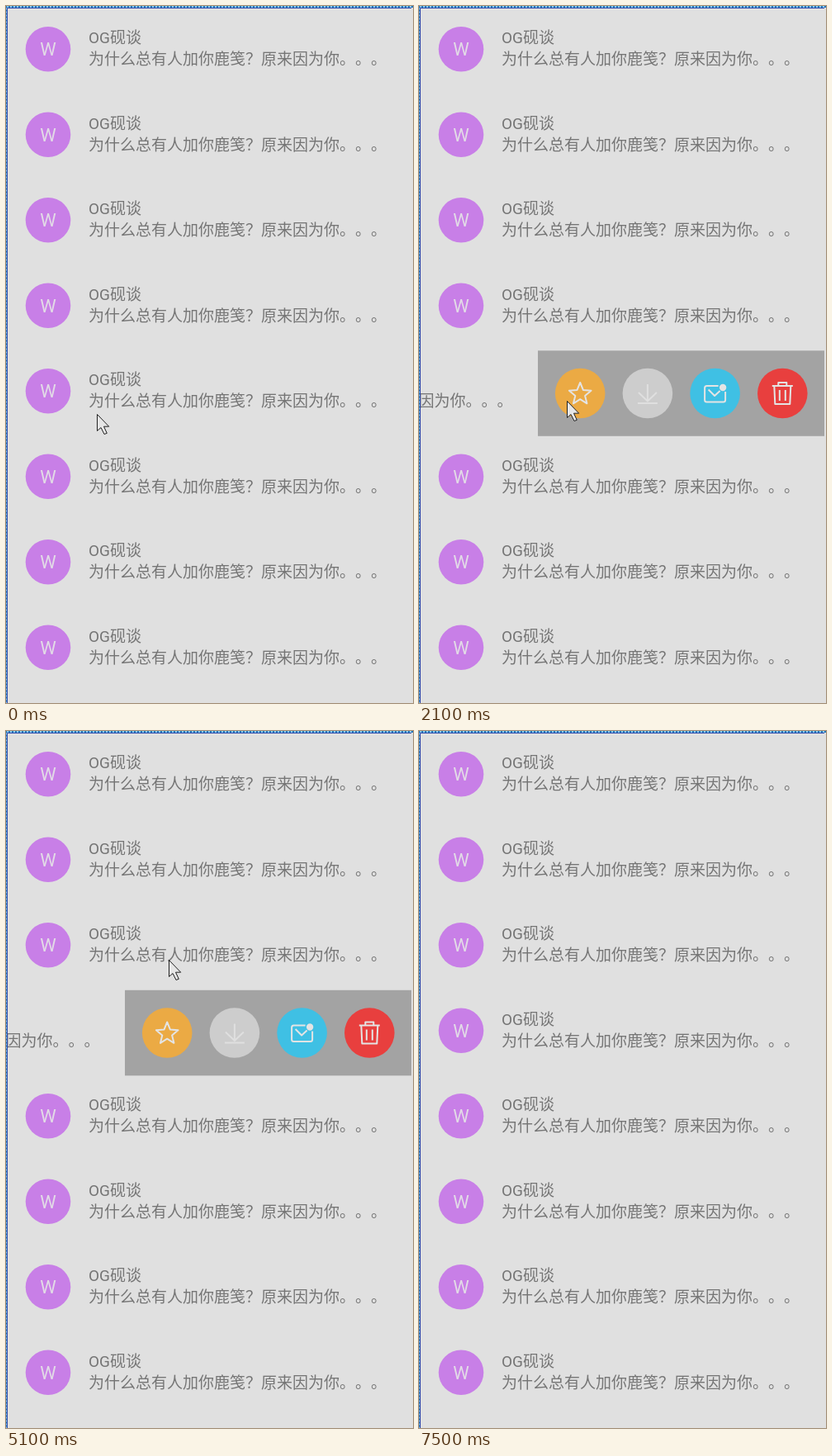
These frames come from a looping animation (493x844 px, 8 s). An HTML page:

```html
<!DOCTYPE html>
<html lang="zh-CN">
<head>
<meta charset="utf-8">
<title>滑动列表</title>
<style>
html, body { margin: 0; width: 100%; height: 100%; overflow: hidden; background: #e0e0e0; }
svg { display: block; }
text { font: 19px Roboto, "Noto Sans CJK SC", sans-serif; fill: #757575; text-spacing-trim: space-all; }
.letter { font-size: 22px; fill: #e2dbe6; text-anchor: middle; }
.icon { fill: none; stroke: #e4e4e4; stroke-width: 2; stroke-linejoin: round; }
</style>
</head>
<body>
<svg width="493" height="844" viewBox="0 0 493 844">
  <defs>
    <clipPath id="view"><rect y="3" width="491" height="841"/></clipPath>
    <g id="item">
      <circle cx="51" cy="49" r="27.3" fill="#c87fe7"/>
      <text class="letter" x="51" y="57">W</text>
      <text x="100" y="42">OG砚谈</text>
      <text x="100" y="68">为什么总有人加你鹿笺&#xFF1F;原来因为你。。。</text>
    </g>
    <path id="star"/>
    <path id="download" stroke-opacity=".8" d="M0-11V9M-11-1L0 9.5L11-1M-12 12H12"/>
    <g id="mail">
      <path d="M4-9H-10Q-12.5-9-12.5-6.5V8Q-12.5 10.5-10 10.5H10Q12.5 10.5 12.5 8V-2M-8-4.5L-.5 3L6-3"/>
      <circle cx="9.5" cy="-7" r="3.2" fill="#e4e4e4"/>
    </g>
    <path id="trash" d="M-12.5-9H12.5M-5-9V-13H5V-9M-10-9L-9 13H9L10-9M-3.5-4V9M3.5-4V9"/>
    <g id="actions"><rect width="347.5" height="103.5" fill="#a3a3a3"/></g>
  </defs>
  <rect width="493" height="844" fill="#e0e0e0"/>
  <g id="list" clip-path="url(#view)"></g>
  <path id="pointer" d="M.5.5V20.5L5 16.5L9 24.5L12.3 23.3L8.5 15.2H14.7Z" fill="#e6e6e6" stroke="#222"/>
  <g fill="none">
    <path d="M493 1H.5V844" stroke="#8ecbec" stroke-width="2"/>
    <path d="M493 1H.5V844" stroke="#2475b8" stroke-width="2" stroke-dasharray="2"/>
    <path d="M491 2.5H1.5V844" stroke="#3049ab"/>
  </g>
</svg>
<script>
const LOOP = 8000, STEP = 300, SLIDE = 600, PITCH = 103.5, TOP = 3.3, OPEN = 347.5;
const $ = id => document.getElementById(id);

$('star').setAttribute('d', 'M' + Array.from({ length: 10 }, (_, i) => {
  const r = i % 2 ? 6.2 : 14, a = i * Math.PI / 5;
  return [r * Math.sin(a), 1 - r * Math.cos(a)].map(v => v.toFixed(2));
}).join('L') + 'Z');

const buttons = { star: '#ebaa44', download: '#cdcdcd', mail: '#3fc0e4', trash: '#e83f3e' };
$('actions').innerHTML += Object.entries(buttons).map(([id, color], i) =>
  `<g transform="translate(${51.2 + 81.7 * i} 51.7)">
    <circle r="30.3" fill="${color}"/><use href="#${id}" class="icon"/></g>`).join('');

$('list').innerHTML = `<g><use href="#item"/><use href="#actions" x="491.5"/></g>`.repeat(8);
const rows = [...$('list').children];

// When a row starts to open and to close
const swipes = {
  4: { open: 1500, close: 2980 },
  3: { open: 4200, close: 5100 },
  2: { open: 5100, close: 5730 }
};

// Pointer stops: time, x, y
const stops = [
  [0, 110, 494], [900, 348, 454], [2100, 179, 478], [3300, 201, 376], [4200, 340, 371],
  [5100, 197, 277], [5400, 330, 270], [6000, 195, 367], [6300, 210, 454], [7500, 491, 456]
];

const ease = ms => Math.min(1, Math.max(0, ms / SLIDE)) ** 2;
const shift = ({ open, close }, t) => OPEN * (ease(t - open) - ease(t - close));
const move = (el, x, y) => el.setAttribute('transform', `translate(${x} ${y})`);

function movePointer(t) {
  const next = stops.findIndex(s => s[0] > t);
  $('pointer').style.display = next < 0 ? 'none' : '';
  if (next < 0) return;
  const [t0, x0, y0] = stops[next - 1], [t1, x1, y1] = stops[next];
  const p = (t - t0) / (t1 - t0);
  move($('pointer'), x0 + (x1 - x0) * p, y0 + (y1 - y0) * p);
}

function draw(now) {
  const t = Math.floor(now % LOOP / STEP) * STEP;
  rows.forEach((row, i) => move(row, swipes[i] ? -shift(swipes[i], t) : 0, TOP + i * PITCH));
  movePointer(t);
}

let start;
function frame(now) {
  start ??= now;
  draw(now - start);
  requestAnimationFrame(frame);
}
draw(0);
requestAnimationFrame(frame);
</script>
</body>
</html>
```
